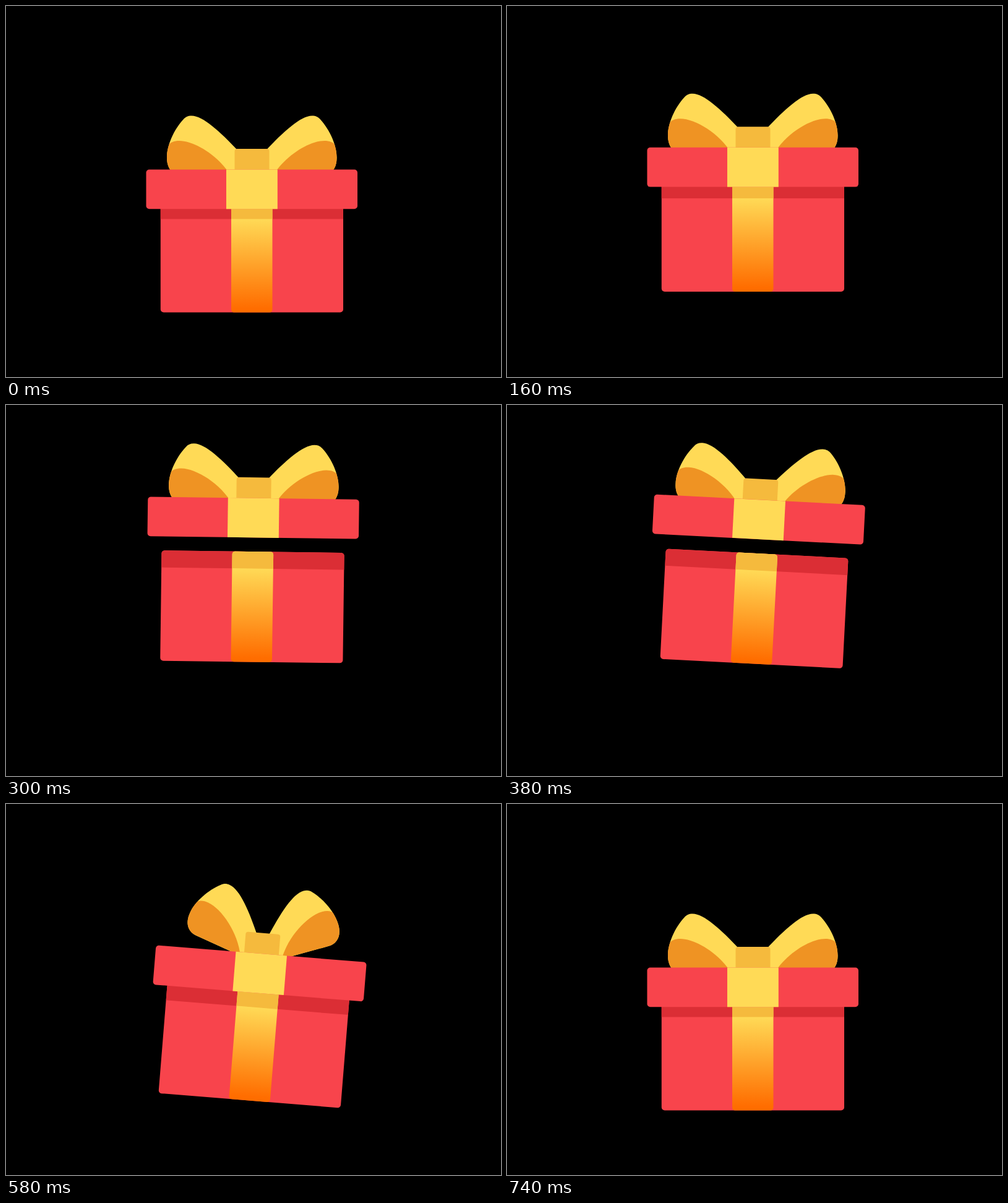
Animation, 800 px wide and 600 px high, one loop 940 ms. Source, as an HTML page:

```html
<!DOCTYPE html>
<html lang="en">
<head>
<meta charset="utf-8">
<title>Gift box</title>
<style>
  html, body { margin: 0; width: 100%; height: 100%; overflow: hidden; background: #000; }
  svg { display: block; width: 800px; height: 600px; }
</style>
</head>
<body>
<svg viewBox="0 0 800 600">
  <defs>
    <linearGradient id="ribbon" gradientUnits="userSpaceOnUse" x1="0" y1="344" x2="0" y2="489">
      <stop offset="0" stop-color="#ffda56"/>
      <stop offset="1" stop-color="#ff6d00"/>
    </linearGradient>
    <path id="loop" d="M375 234C346 203 318 177.5 300 177.5C294 177.5 290 179.5 287 183C271 200 260 226 260 245C260 264 270 274.5 285 274.5H385V250Z"/>
    <clipPath id="loopClip"><use href="#loop"/></clipPath>
    <clipPath id="boxClip"><rect x="249.8" y="317" width="295.2" height="178.5" rx="5"/></clipPath>
    <clipPath id="bandClip"><rect x="364" y="317" width="66.5" height="178.5" rx="4.5"/></clipPath>
    <g id="wing">
      <use href="#loop" fill="#ffda56"/>
      <path clip-path="url(#loopClip)" fill="#ef9323" d="M261 227C265 220 272 218 280 218C304 218 344 242 363 274.5H250Z"/>
    </g>
  </defs>
  <rect width="800" height="600"/>
  <g id="gift">
    <g clip-path="url(#boxClip)">
      <rect x="249" y="316" width="297" height="181" fill="#f8444c"/>
      <rect x="249" y="316" width="297" height="28.5" fill="#db2e35"/>
    </g>
    <g clip-path="url(#bandClip)">
      <rect x="363" y="316" width="69" height="181" fill="url(#ribbon)"/>
      <rect x="363" y="316" width="69" height="28.5" fill="#f5ba3d"/>
    </g>
    <g id="lid">
      <use class="wing" href="#wing"/>
      <g transform="translate(794.6 0) scale(-1 1)"><use class="wing" href="#wing"/></g>
      <path fill="#f5ba3d" d="M369.5 266V235q0-4 4-4H421.5q4 0 4 4V266Z"/>
      <rect x="226.5" y="264.5" width="341.5" height="63.8" rx="5" fill="#f8444c"/>
      <rect x="356" y="264.5" width="82.8" height="63.8" fill="#ffda56"/>
    </g>
  </g>
</svg>
<script>
  const LOOP = 940, STEP = 20, LAST = 740;
  const gift = document.getElementById('gift');
  const lid = document.getElementById('lid');
  const wings = document.querySelectorAll('.wing');

  const smooth = u => u * u * (3 - 2 * u);
  const easeOut = u => u * (2 - u);

  // Each key: [time, value, easing from the previous key]
  const tracks = {
    jump: [[29, 0], [328, -82], [678, 0]],
    settle: [[580, -15.7], [715, 0, easeOut]],
    tilt: [[240, 0], [480, 4.75], [562, 4.85], [700, 0]],
    lift: [[133, 0], [304, 34], [500, 35.2], [613, 0]],
    fold: [[380, 0], [562, 20], [576, 20], [740, 0]]
  };

  function sample(keys, t) {
    if (t <= keys[0][0]) return keys[0][1];
    for (let i = 1; i < keys.length; i++) {
      const [t0, v0] = keys[i - 1];
      const [t1, v1, ease = smooth] = keys[i];
      if (t < t1) return v0 + (v1 - v0) * ease((t - t0) / (t1 - t0));
    }
    return keys[keys.length - 1][1];
  }

  function draw(ms) {
    const t = Math.min(LAST, Math.floor(ms / STEP) * STEP);
    const y = sample(t < 580 ? tracks.jump : tracks.settle, t);
    gift.setAttribute('transform', `translate(0 ${y}) rotate(${sample(tracks.tilt, t)} 397.3 448)`);
    lid.setAttribute('transform', `translate(0 ${-sample(tracks.lift, t)})`);
    const fold = `rotate(${sample(tracks.fold, t)} 375 274.5)`;
    wings.forEach(w => w.setAttribute('transform', fold));
  }

  const start = performance.now();
  function tick() {
    draw((performance.now() - start) % LOOP);
    requestAnimationFrame(tick);
  }
  tick();
</script>
</body>
</html>
```
